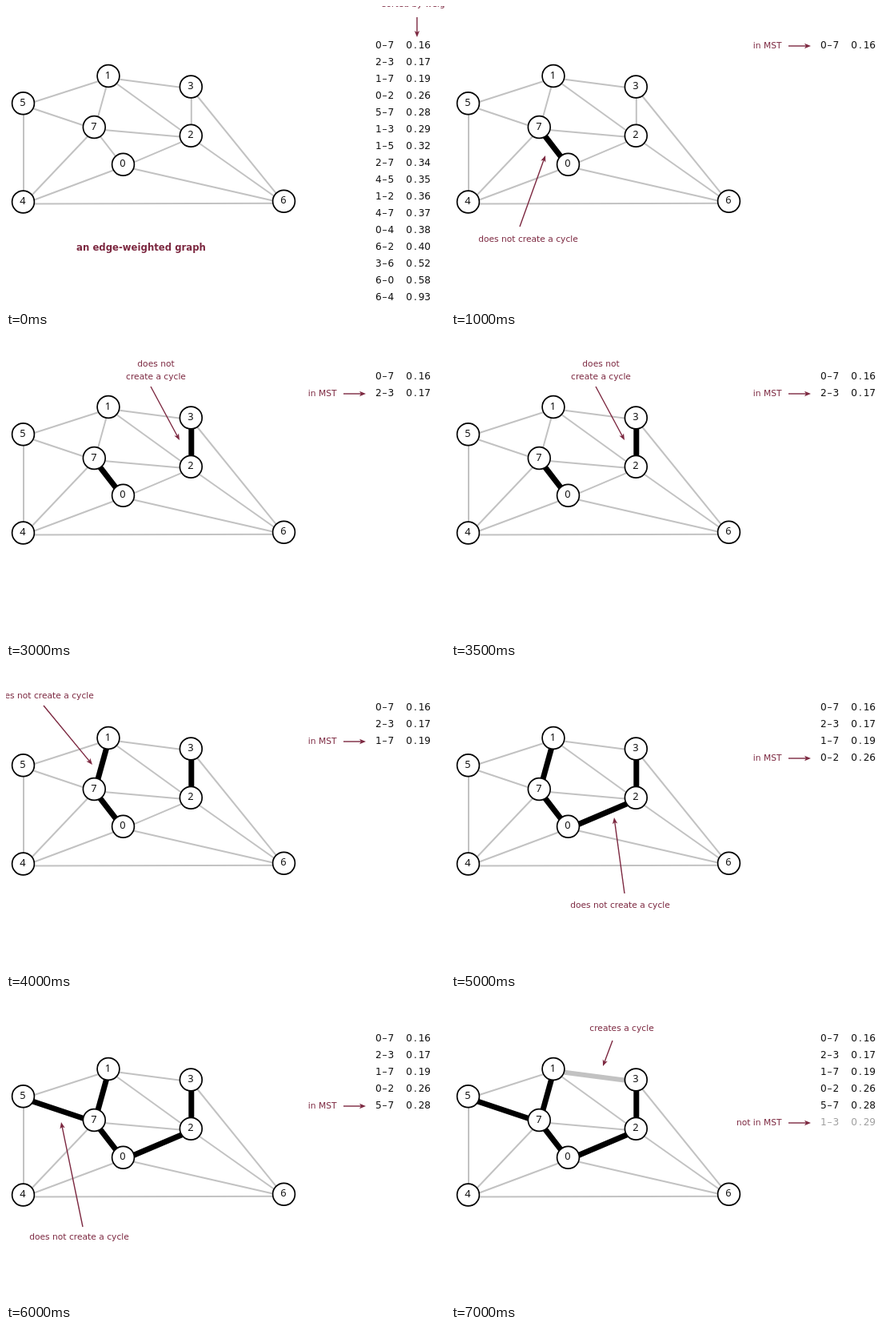
Animation of 549 by 379 pixels, one loop 8000 ms. Source, as an HTML page with a canvas:

```html
<!DOCTYPE html>
<html lang="en">
<head>
<meta charset="utf-8">
<title>Minimum spanning tree</title>
<style>
html, body { margin: 0; width: 100%; height: 100%; overflow: hidden; background: #fff; }
canvas { display: block; }
</style>
</head>
<body>
<canvas width="549" height="379"></canvas>
<script>
const ctx = document.querySelector('canvas').getContext('2d');
const SANS = '"DejaVu Sans", sans-serif', DIGITS = '"Noto Sans", sans-serif';
const RED = '#7c2840', GREY = '#c2c2c2';
const LOOP = 8000;
const nodes = [[146.5, 198.3], [128, 87.5], [231.3, 162.3], [231.3, 101], [21.5, 245], [21.5, 121.7], [347.5, 244.3], [110.3, 151.5]];
const rows = ['0-7  0.16', '2-3  0.17', '1-7  0.19', '0-2  0.26', '5-7  0.28', '1-3  0.29', '1-5  0.32', '2-7  0.34',
  '4-5  0.35', '1-2  0.36', '4-7  0.37', '0-4  0.38', '6-2  0.40', '3-6  0.52', '6-0  0.58', '6-4  0.93'];
const NO_CYCLE = 'does not create a cycle';

// Each step considers one more edge: labels are [text, center x, center y]
const steps = [
  { at: 1000, labels: [[NO_CYCLE, 96.5, 291]], arrow: [86, 276, 118, 187] },
  { at: 3000, labels: [['does not', 187.5, 33], ['create a cycle', 187.5, 49]], arrow: [181, 62, 217, 129] },
  { at: 4000, labels: [[NO_CYCLE, 47.5, 34]], arrow: [47, 47, 108, 121] },
  { at: 5000, labels: [[NO_CYCLE, 211.5, 296]], arrow: [217, 282, 204, 187] },
  { at: 6000, labels: [[NO_CYCLE, 91.5, 297]], arrow: [96, 285, 69, 154] },
  { at: 6500, labels: [['creates a cycle', 213.5, 36]], arrow: [202, 52, 190, 84], rejected: true }
];

const rowY = i => 49 + 21 * i;

function text(str, x, y, color = RED, font = `10.7px ${SANS}`, align = 'center') {
  ctx.font = font;
  ctx.fillStyle = color;
  ctx.textAlign = align;
  ctx.fillText(str, x, y);
}

function line(x1, y1, x2, y2, color, width) {
  ctx.strokeStyle = color;
  ctx.lineWidth = width;
  ctx.beginPath();
  ctx.moveTo(x1, y1);
  ctx.lineTo(x2, y2);
  ctx.stroke();
}

function arrow(x1, y1, x2, y2) {
  const angle = Math.atan2(y2 - y1, x2 - x1);
  line(x1, y1, x2 - 4 * Math.cos(angle), y2 - 4 * Math.sin(angle), RED, 1.4);
  ctx.save();
  ctx.translate(x2, y2);
  ctx.rotate(angle);
  ctx.fillStyle = RED;
  ctx.beginPath();
  ctx.moveTo(0, 0);
  ctx.lineTo(-8, -3.2);
  ctx.lineTo(-6, 0);
  ctx.lineTo(-8, 3.2);
  ctx.fill();
  ctx.restore();
}

// Edges meet slightly below and right of the circle centers
function edge(row, color, width) {
  const [x1, y1] = nodes[row[0]], [x2, y2] = nodes[row[2]];
  line(x1 + 0.5, y1 + 2.5, x2 + 0.5, y2 + 2.5, color, width);
}

function node([x, y], i) {
  ctx.beginPath();
  ctx.arc(x, y, 13.9, 0, 2 * Math.PI);
  ctx.fillStyle = '#fff';
  ctx.fill();
  ctx.strokeStyle = '#000';
  ctx.lineWidth = 1.7;
  ctx.stroke();
  text(i, x - 0.5, y + 3, '#111', `12.8px ${DIGITS}`);
}

function listRow(row, i, color) {
  [...row.replace('-', '–')].forEach((c, k) => text(c, 466 + 7.65 * k, rowY(i) + 3.7, color, `12.2px ${SANS}`));
}

function draw(time) {
  const current = steps.filter(s => s.at <= time).length - 1;
  const step = steps[current];
  const rejected = i => steps[i] && steps[i].rejected;

  ctx.fillStyle = '#fff';
  ctx.fillRect(0, 0, 549, 379);
  rows.forEach(row => edge(row, GREY, 2));
  rows.slice(0, current + 1).forEach((row, i) => edge(row, rejected(i) ? GREY : '#000', rejected(i) ? 6 : 7));
  nodes.forEach(node);

  if (!step) {
    rows.forEach((row, i) => listRow(row, i, '#111'));
    text('sorted by weight', 470, 0.5, RED, `10.7px ${SANS}`, 'left');
    arrow(514, 14, 514, 39);
    text('an edge-weighted graph', 169, 306, RED, `bold 11.7px ${SANS}`);
    return;
  }
  rows.slice(0, current + 1).forEach((row, i) => listRow(row, i, rejected(i) ? '#a0a0a0' : '#111'));
  const y = rowY(current);
  text(step.rejected ? 'not in MST' : 'in MST', 413.5, y + 3.5, RED, `10.7px ${SANS}`, 'right');
  arrow(422, y + 1, 450, y + 1);
  step.labels.forEach(([str, x, ly]) => text(str, x, ly + 4));
  arrow(...step.arrow);
}

function tick() {
  draw(performance.now() % LOOP);
  requestAnimationFrame(tick);
}
tick();
</script>
</body>
</html>
```
